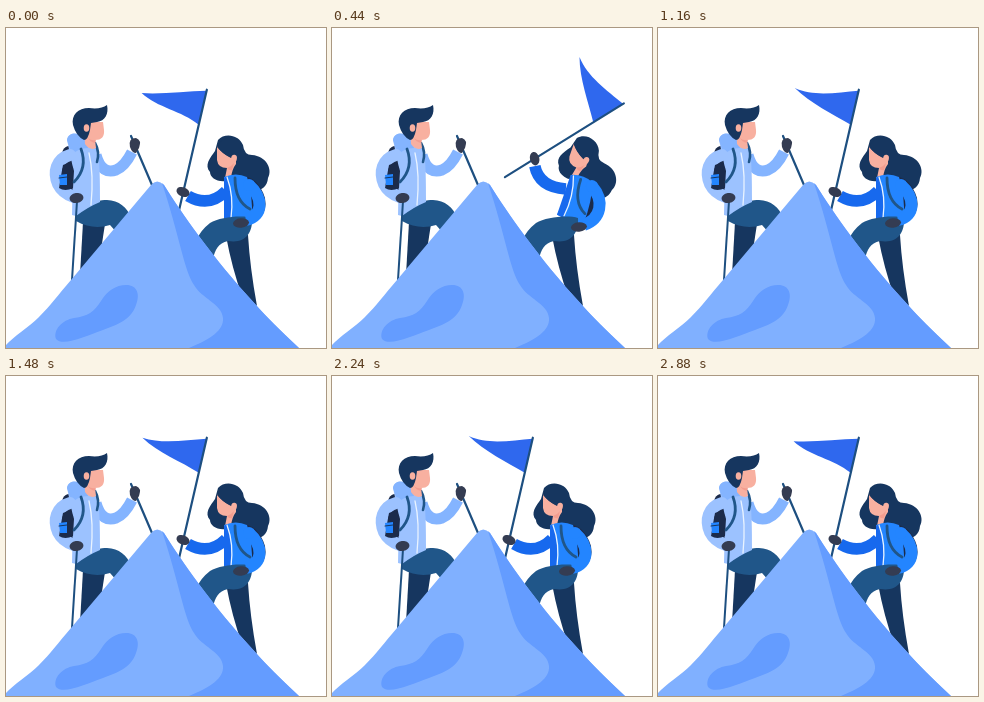
An HTML page with a canvas for the animation above (2920 ms loop, 320 by 320 pixels).

```html
<!DOCTYPE html>
<html lang="en">
<head>
<meta charset="utf-8">
<title>Summit</title>
<style>
html, body { margin: 0; width: 100%; height: 100%; overflow: hidden; background: #fff; }
canvas { display: block; width: 320px; height: 320px; }
</style>
</head>
<body>
<canvas id="stage"></canvas>
<script>
const LOOP = 2920;
const PEAK = 520;
const IMPACT = 720;
const SETTLE = 320;
const REACH = 1.38;
const TAU = Math.PI * 2;
const RAD = Math.PI / 180;

const C = {
  navy: '#16365f', pants: '#205689', pack: '#1b2b4b', glove: '#343c52',
  skin: '#f8b0a0', skinDark: '#f39d8f', pale: '#84b4ff', paleLight: '#9cc2ff',
  blue: '#2385ff', deep: '#1769ee', flag: '#2f68ee', pole: '#1d4f80',
  rock: '#80b0ff', shade: '#649cff', zip: '#e9f3ff'
};

const canvas = document.getElementById('stage');
const ctx = canvas.getContext('2d');
const dpr = window.devicePixelRatio || 1;
canvas.width = canvas.height = 320 * dpr;

const lerp = (a, b, k) => a + (b - a) * k;
const mix = (a, b, k) => a.map((v, i) => lerp(v, b[i], k));

function fill(d, color) {
  ctx.fillStyle = color;
  ctx.fill(new Path2D(d));
}

function stroke(d, color, width, cap = 'round') {
  ctx.strokeStyle = color;
  ctx.lineWidth = width;
  ctx.lineCap = cap;
  ctx.lineJoin = 'round';
  ctx.stroke(new Path2D(d));
}

function oval(x, y, rx, ry, turn, color) {
  ctx.fillStyle = color;
  ctx.beginPath();
  ctx.ellipse(x, y, rx, ry, turn * RAD, 0, TAU);
  ctx.fill();
}

function turned(x, y, deg, draw, shift = 0) {
  ctx.save();
  ctx.translate(x + shift, y);
  ctx.rotate(deg * RAD);
  ctx.translate(-x, -y);
  draw();
  ctx.restore();
}

// Accelerating lift, straight thrust down, then a soft return from the overshoot.
function swing(t) {
  if (t < PEAK) return { lift: REACH * (t / PEAK) ** 2, kick: 0 };
  if (t < IMPACT) {
    const u = (t - PEAK) / (IMPACT - PEAK);
    return { lift: REACH * (1 - u), kick: u ** 2.5 };
  }
  const s = Math.min(1, (t - IMPACT) / SETTLE);
  return { lift: 0, kick: (1 + Math.cos(Math.PI * s)) / 2 };
}

function flutter(t) {
  const phase = t < IMPACT ? lerp(13, 360, t / IMPACT) : (t - IMPACT) / 3;
  return Math.cos(phase * RAD);
}

function drawFlag(hand, angle, c) {
  ctx.save();
  ctx.translate(hand[0], hand[1]);
  ctx.rotate(angle * RAD);
  ctx.translate(0, -106);
  const tip = 15.2 + 2.8 * c;
  fill(`M0 1 C-20 ${6.8 - 0.8 * c} -42 ${16 - 1.5 * c} -62.8 ${tip}
    C-44 ${26.5 + 2.5 * c} -20 ${28 - 2 * c} 0 36Z`, C.flag);
  stroke('M0 0 V140', C.pole, 2.2);
  ctx.restore();
}

function drawMountain() {
  fill(`M0 317 C8 308 22 300 33 289 C44 278 52 267 65 252 L145 157
    Q151 150 158 157 C175 184 205 228 250 277 Q264 293 293 320 H0Z`, C.rock);
  fill(`M156 155 L158 157 C175 184 205 228 250 277 Q264 293 293 320 H183
    C205 311 218 302 217 290 C216 276 195 270 188 257
    C178 242 174 210 156 155Z`, C.shade);
  fill(`M50 311 C47 302 56 292 68 290 C82 288 88 284 95 273
    C101 263 110 257 120 257 C132 257 134 267 130 277
    C125 292 111 297 97 302 C80 308 57 319 50 311Z`, C.shade);
}

function drawMan() {
  fill('M77 194 L99 196 L95 222 L74 247Z', C.navy);
  fill(`M70 190 C72 179 88 172 101 172 C113 173 121 178 126 192
    L112 206 L104 197 C94 200 82 200 70 193Z`, C.pants);
  fill('M57 122 Q61 115 70 120 L73 160 Q64 165 54 162 Q50 140 57 122Z', C.pack);

  stroke('M90 127 C94 142 102 145 110 142 C117 139 122 132 126 124', C.pale, 11, 'butt');
  fill(`M61 112 C62 104 71 105 77 108 L91 117 C94 130 94 155 94 174
    Q82 179 70 188 L66 187 L67 140Z`, C.paleLight);
  fill('M61 112 C63 103 73 105 79 109 L82 120 Q72 120 66 127Z', C.pale);
  stroke('M83 125 Q88 146 85 177', C.zip, 1.3);
  stroke('M89 115 Q94 124 91 134', C.pants, 2.6);

  fill('M78 94 H97 L98 102 Q99 112 89 112 L90 120 Q84 123 79 116Z', C.skin);
  fill('M82 110 Q85 113 90 112 L89 115 Q84 114 82 110Z', C.skinDark);
  fill(`M67 97 C65 87 72 80 83 80 C91 81 97 80 101 77
    C103 86 99 93 91 94 L85 95 L84 102 Q82 112 78 112 Q70 108 67 97Z`, C.navy);
  oval(80.5, 100, 2.8, 3.8, 0, C.skin);

  stroke('M64 127 C50 131 47 144 52 156 C56 164 62 167 68 169', C.paleLight, 12);
  fill('M57 137 Q66 132 68 143 L67 160 Q59 164 53 160Z', C.pack);
  fill('M53 147 L61 146 L61 157 L54 157Z', C.blue);
  stroke('M53 150 L61 149', C.navy, 1);
  stroke('M75 121 Q82 140 68 154', C.pants, 2.8);

  stroke('M71.5 165 L66 252', C.pole, 2, 'butt');
  oval(70.5, 170, 7, 5, -8, C.glove);
  stroke('M125 108 L146 157', C.pole, 2.2);
  fill('M124 119 Q122 110 130 110 Q136 112 133 120 L130 125 Q126 125 124 119Z', C.glove);
}

function drawHead() {
  fill(`M212 112 C219 104 233 107 237 117 Q238 127 246 127
    C260 128 267 141 262 150 C261 161 252 164 245 161
    C238 158 231 152 224 152 C213 156 204 150 204 144
    C198 137 204 130 209 123Z`, C.navy);
  fill(`M211 118 Q216 126 224 129 L230 130 L230 136 Q226 141 225 150
    L219 150 L221 140 Q212 140 211 132Z`, C.skin);
  fill('M221 140 Q225 139 228 135 L226 142 Q223 143 221 140Z', C.skinDark);
  fill('M211 119 Q218 106 232 111 L232 129 L225 130 Q217 126 211 119Z', C.navy);
  oval(228, 130.5, 2.9, 3.8, 10, C.skin);
}

function drawTorso() {
  fill('M235 148 Q252 148 259 170 Q261 182 255 188 L238 186Z', C.pack);
  fill('M218 149 Q230 144 241 149 Q247 166 246 192 L218 191 Q221 171 218 149Z', C.blue);
  fill('M218 150 L221 148 Q227 169 225 192 L218 191Z', C.deep);
  stroke('M221 149 Q228 168 225 190', C.zip, 1.3);
}

function drawWoman(lift, kick, hand) {
  const leaning = (draw) => turned(232, 195, 19 * lift, draw, 5 * lift);

  fill('M220 208 L242 207 Q244 240 251 278 L236 268 Q226 240 220 208Z', C.navy);
  leaning(drawHead);

  const shoulder = mix([220, 163], [234, 161], lift);
  const elbow = mix([203, 180], [207, 159], lift);
  const wrist = mix([182, 168], [203, 138], lift);
  stroke(`M${shoulder} Q${elbow} ${wrist}`, C.deep, 11.5, 'butt');

  leaning(drawTorso);

  fill(`M246 190 C236 187 214 189 204 195 Q195 202 191 211
    L194 224 L207 231 C209 222 212 215 222 213 C239 216 247 205 246 190Z`, C.pants);

  const push = -7 * kick;
  const arm = mix(
    [243, 157, 257, 169, 258, 188, 240, 192],
    [260, 158, 273, 173, 269, 191, 252, 197], lift
  ).map((v, i) => i % 2 || i === 0 ? v : v + push);
  stroke(`M${arm[0]} ${arm[1]} C${arm.slice(2).join(' ')}`, C.blue, 12, 'butt');
  oval(arm[0], arm[1], 6, 6, 0, C.blue);
  leaning(() => stroke('M229 150 C229 165 234 176 244 181', C.pants, 2.8));

  const palm = mix([235, 195], [247, 199], lift);
  oval(palm[0] + push, palm[1], 8, 4.7, -5, C.glove);

  turned(hand[0], hand[1], 55 * lift, () => {
    oval(hand[0], hand[1] - 1, 6.8, 4.7, 22, C.glove);
  });
}

function draw(t) {
  const { lift, kick } = swing(t);
  const hand = mix([177, 165], [202, 131], lift);
  const angle = 13 + 45.5 * lift - 3.2 * kick;

  ctx.setTransform(dpr, 0, 0, dpr, 0, 0);
  ctx.fillStyle = '#fff';
  ctx.fillRect(0, 0, 320, 320);
  drawFlag(hand, angle, flutter(t));
  drawWoman(lift, kick, hand);
  drawMan();
  drawMountain();
}

const start = performance.now();
function frame() {
  draw((performance.now() - start) % LOOP);
  requestAnimationFrame(frame);
}
frame();
</script>
</body>
</html>
```
